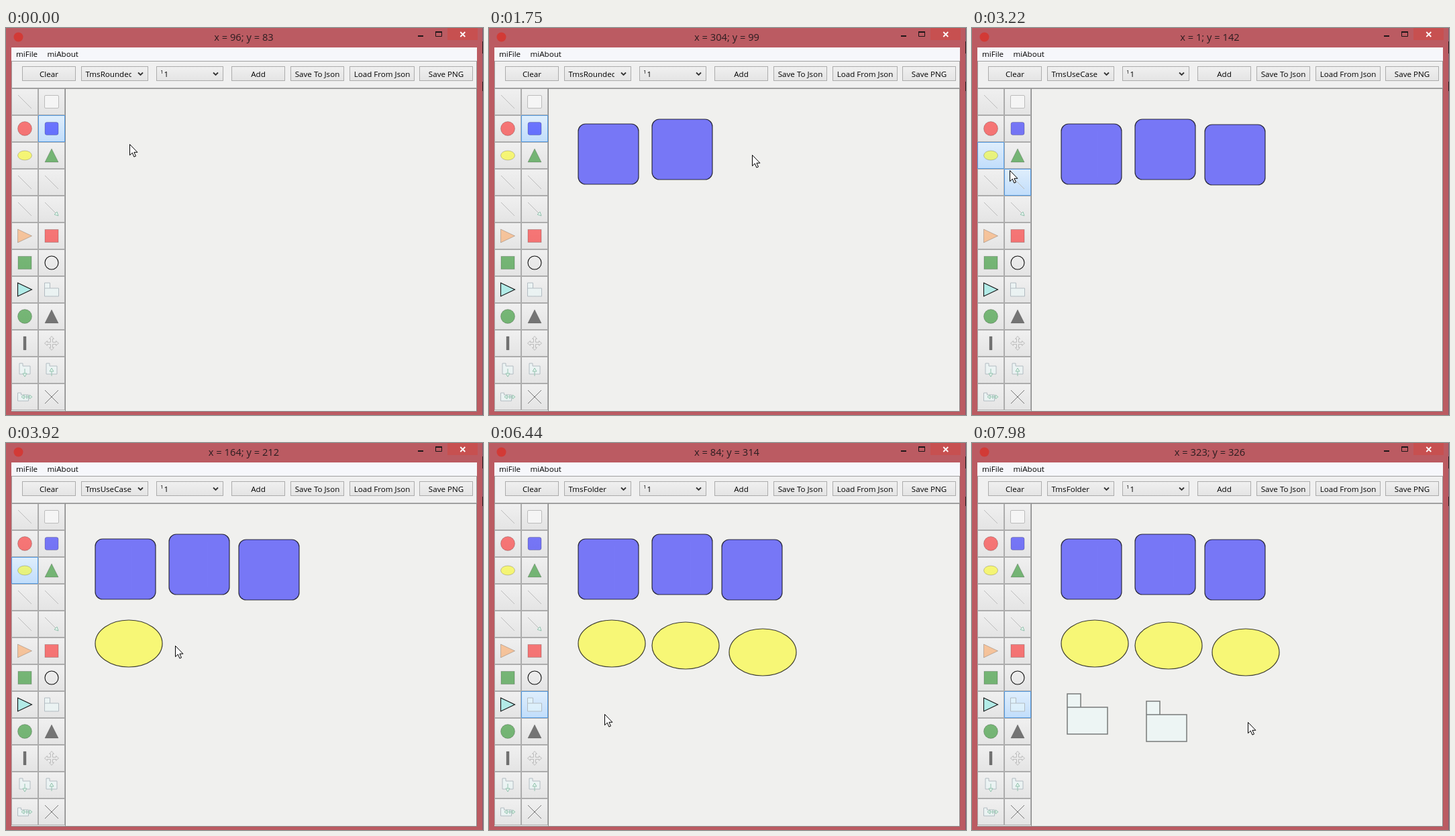
An HTML page that plays this animation: 711 px wide and 577 px high, repeating every 8 s.

```html
<!DOCTYPE html>
<html lang="en">
<head>
<meta charset="utf-8">
<title>Diagram editor</title>
<style>
html, body { margin: 0; width: 100%; height: 100%; overflow: hidden; background: #bb5b62; }
svg { display: block; }
text { font: 11.6px "Open Sans", "Noto Sans", sans-serif; fill: #000; }
.mid { text-anchor: middle; }
#title { font-size: 14.7px; fill: #2b1d20; }
.btn { fill: url(#face); stroke: #acacac; }
.cell.on .btn { fill: url(#lit); stroke: #569de5; }
.icon { fill-opacity: .5; stroke: #000; stroke-opacity: .2; }
.thin { fill: none; stroke: #bcbcbc; }
.black { stroke: #111; stroke-width: 1.1; }
.pale { fill: #ecfcfc; fill-opacity: .5; stroke: #b3bcc2; }
.mint { fill: #e6f4ee; stroke: #93c2ae; }
.node { fill-opacity: .5; stroke: #000; stroke-opacity: .75; stroke-width: 1.2; }
.folder { fill: #ecfcfc; stroke-opacity: .5; stroke-width: 1.5; }
</style>
</head>
<body>
<svg width="711" height="577" viewBox="0 0 711 577">
  <defs>
    <linearGradient id="face" x2="0" y2="1"><stop stop-color="#f0f0f0"/><stop offset="1" stop-color="#e4e4e4"/></linearGradient>
    <linearGradient id="lit" x2="0" y2="1"><stop stop-color="#dfeefc"/><stop offset="1" stop-color="#c1ddfb"/></linearGradient>
    <clipPath id="comboClip"><rect x="116" y="58" width="71" height="20"/></clipPath>
  </defs>

  <!-- window frame -->
  <rect width="711" height="577" fill="#bb5b62"/>
  <rect x="710" width="1" height="577" fill="#7d5a70"/>
  <path d="M710.5 20v18M710.5 80v14" stroke="#1c1820"/>
  <circle cx="18.5" cy="13.5" r="7" fill="#d23a36"/>
  <text id="title" class="mid" x="354.5" y="19"></text>
  <rect x="658" width="45" height="18" fill="#c75050"/>
  <path d="M677.3 6l7 7M684.3 6l-7 7" stroke="#fff" stroke-width="1.8"/>
  <path d="M614 12h8M640 6h10" stroke="#1e1618" stroke-width="2"/>
  <path d="M640.5 6v6.5h9V6" fill="none" stroke="#1e1618"/>

  <!-- menu and panels -->
  <rect x="8" y="29" width="694" height="543" fill="#f0f0f0"/>
  <rect x="8" y="29" width="694" height="20" fill="#f6f7fb"/>
  <text x="15" y="43">miFile</text>
  <text x="61.5" y="43">miAbout</text>
  <path d="M8 49.5h694M8.5 49v42M701.5 49v42" stroke="#a0a0a0"/>
  <rect x="88" y="90" width="614" height="481" fill="#f0f0ee"/>
  <g id="bar"></g>
  <g id="tools"></g>
  <path d="M8 90h694" stroke="#a0a0a0" stroke-width="2"/>
  <path d="M88.5 90v481M701.5 90v481M8 571.5h694" stroke="#8c8c8c"/>
  <g id="nodes"></g>
  <path id="cursor" d="M.5 .5v16.2l3.8-3.6 2.6 6 2.6-1.100-2.600-5.700h5z" fill="#fff" stroke="#000"/>
</svg>
<script>
const $ = id => document.getElementById(id);
const LOOP = 8000, TICK = 70;
const LEFT = 88, TOP = 90, CELL = 40;

// Toolbar
const button = (x, w, label = "") =>
  `<rect class="btn" x="${x + .5}" y="57.5" width="${w - 1}" height="21"/>
   <text class="mid" x="${x + w / 2}" y="73">${label}</text>`;
const combo = x => button(x, 100) +
  `<path d="M${x + 85} 66.5l3.5 3.5 3.5-3.5" fill="none" stroke="#333" stroke-width="1.8"/>`;

$("bar").innerHTML =
  button(24, 80, "Clear") + combo(112) + combo(224) + button(336, 80, "Add") +
  button(424, 80, "Save To Json") + button(512, 97, "Load From Json") + button(616, 80, "Save PNG") +
  `<g clip-path="url(#comboClip)"><text id="kind" x="118.5" y="73"></text></g>
   <text x="230" y="67.5" style="font-size:8px">1</text><text x="235.5" y="73">1</text>`;

// Tool icons, each drawn around (0, 0)
const path = (d, cls, fill = "") => `<path class="${cls}" d="${d}" fill="${fill}"/>`;
const oval = (ry, fill) => `<ellipse class="icon" rx="10.5" ry="${ry}" fill="${fill}"/>`;
const square = (fill, r = 0) => `<rect class="icon" x="-10" y="-9.5" width="20" height="19" rx="${r}" fill="${fill}"/>`;
const up = fill => path("M0-10L10 10H-10Z", "icon", fill);
const slash = path("M-10-10L10 10", "thin");
const right = "M-10.5-10L10.5 0L-10.5 10Z";
const miniFolder = path("M-8-10h5v4h11v12h-16z", "pale");
const arm = turn => `<path class="thin" transform="rotate(${turn})" d="M-1.500-1.500v-5h-2l3.500-4 3.500 4h-2v5"/>`;

const icons = [
  slash, `<rect class="thin" x="-10.5" y="-9.5" width="21" height="19" rx="1.5" style="fill:#f5f5f5"/>`,
  oval(10.5, "red"), square("blue", 3),
  oval(7, "yellow"), up("green"),
  slash, slash,
  slash, slash + path("M10 10l-6-2 4-4z", "mint"),
  path(right, "icon", "#ff9c4c"), square("red"),
  square("green"), `<circle class="black" r="10" fill="none"/>`,
  path(right, "black", "#b2ebe7"), path("M-10.5-10h8v8h13v12h-21zM-10.5-2h8", "pale"),
  oval(10.5, "green"), up("black"),
  path("M-2-10h4v20h-4z", "icon", "black"), [0, 90, 180, 270].map(arm).join(""),
  miniFolder + path("M0-2v7M-3 5h6l-3 5z", "mint"),
  miniFolder + path("M0 9v-7M-3 2h6l-3-5z", "mint"),
  path("M-10.5-6h5v3h11v9h-16z", "pale") + path("M-1 0h8M-1-3v6l-4-3zM7-3v6l4-3zM3-3v6", "mint"),
  `<path d="M-10-10L10 10M10-10L-10 10" stroke="#777"/>`
];

$("tools").innerHTML = icons.map((icon, i) =>
  `<g class="cell" transform="translate(${28 + CELL * (i % 2)} ${110 + CELL * (i >> 1)})">
   <rect class="btn" x="-19.5" y="-19.5" width="39" height="39"/>${icon}</g>`).join("");
const cells = [...$("tools").children];

const shapes = {
  rounded: `<rect class="node" x="-45" y="-45" width="90" height="90" rx="11" fill="blue"/>`,
  useCase: `<ellipse class="node" rx="50" ry="35" fill="yellow"/>`,
  folder: `<path class="node folder" d="M-30-30h20v20h40v40h-60zM-30-10h20"/>`
};
const tools = { TmsRounded: 3, TmsUseCase: 4, TmsFolder: 15 };

// Pointer legs in ticks: leave, arrive, x, y, then what the click makes or picks and its delay
const legs = [
  [0, 0, 184, 173, "TmsRounded", 0],
  [1, 2, 178, 188, "rounded", 1],
  [4, 9, 278, 187],
  [10, 14, 288, 181, "rounded", 1],
  [18, 22, 421, 200],
  [22, 25, 392, 189, "rounded", 3],
  [30, 34, 190, 336],
  [34, 36, 89, 232],
  [36, 37, 85, 221],
  [37, 43, 31, 194, "TmsUseCase", 2],
  [45, 51, 183, 299, "useCase", 2],
  [54, 56, 252, 302],
  [56, 58, 293, 302, "useCase", 1],
  [60, 66, 427, 306],
  [67, 69, 408, 312, "useCase", 2],
  [75, 76, 305, 311],
  [76, 83, 72, 391, "TmsFolder", 3],
  [86, 92, 172, 404, "folder", 2],
  [95, 102, 290, 415, "folder", 1],
  [104, 110, 419, 432],
  [111, 114, 411, 416]
];
const clicks = legs.filter(leg => leg[4])
  .map(([, arrive, x, y, what, delay]) => ({ at: arrive + delay, x, y, what }));
const picks = clicks.filter(c => c.what in tools);
const drops = clicks.filter(c => c.what in shapes);

$("nodes").innerHTML = drops.map(({ x, y, what }) =>
  `<g transform="translate(${x} ${y})">${shapes[what]}</g>`).join("");
const nodes = [...$("nodes").children];

function pointer(tick) {
  let [x, y] = legs[0].slice(2);
  for (const [leave, arrive, toX, toY] of legs) {
    if (tick <= leave) break;
    const k = Math.min(1, (tick - leave) / (arrive - leave));
    x += (toX - x) * k;
    y += (toY - y) * k;
  }
  return [Math.round(x), Math.round(y)];
}

// The title keeps the last position inside the canvas.
function lastOnCanvas(tick) {
  let p = pointer(tick);
  while (p[0] < LEFT) p = pointer(--tick);
  return p;
}

function draw(time) {
  const tick = Math.floor(time % LOOP / TICK);
  const [x, y] = pointer(tick);
  const [tx, ty] = lastOnCanvas(tick);
  const tool = picks.filter(p => p.at <= tick).pop().what;
  const hover = x < LEFT ? 2 * Math.floor((y - TOP) / CELL) + Math.floor((x - 8) / CELL) : -1;

  $("cursor").setAttribute("transform", `translate(${x} ${y})`);
  $("title").textContent = `x = ${tx - LEFT}; y = ${ty - TOP}`;
  $("kind").textContent = tool;
  cells.forEach((cell, i) => cell.classList.toggle("on", i === tools[tool] || i === hover));
  nodes.forEach((node, i) => node.style.display = tick >= drops[i].at ? "" : "none");
}

const start = performance.now();
(function frame() {
  draw(performance.now() - start);
  requestAnimationFrame(frame);
})();
</script>
</body>
</html>
```
